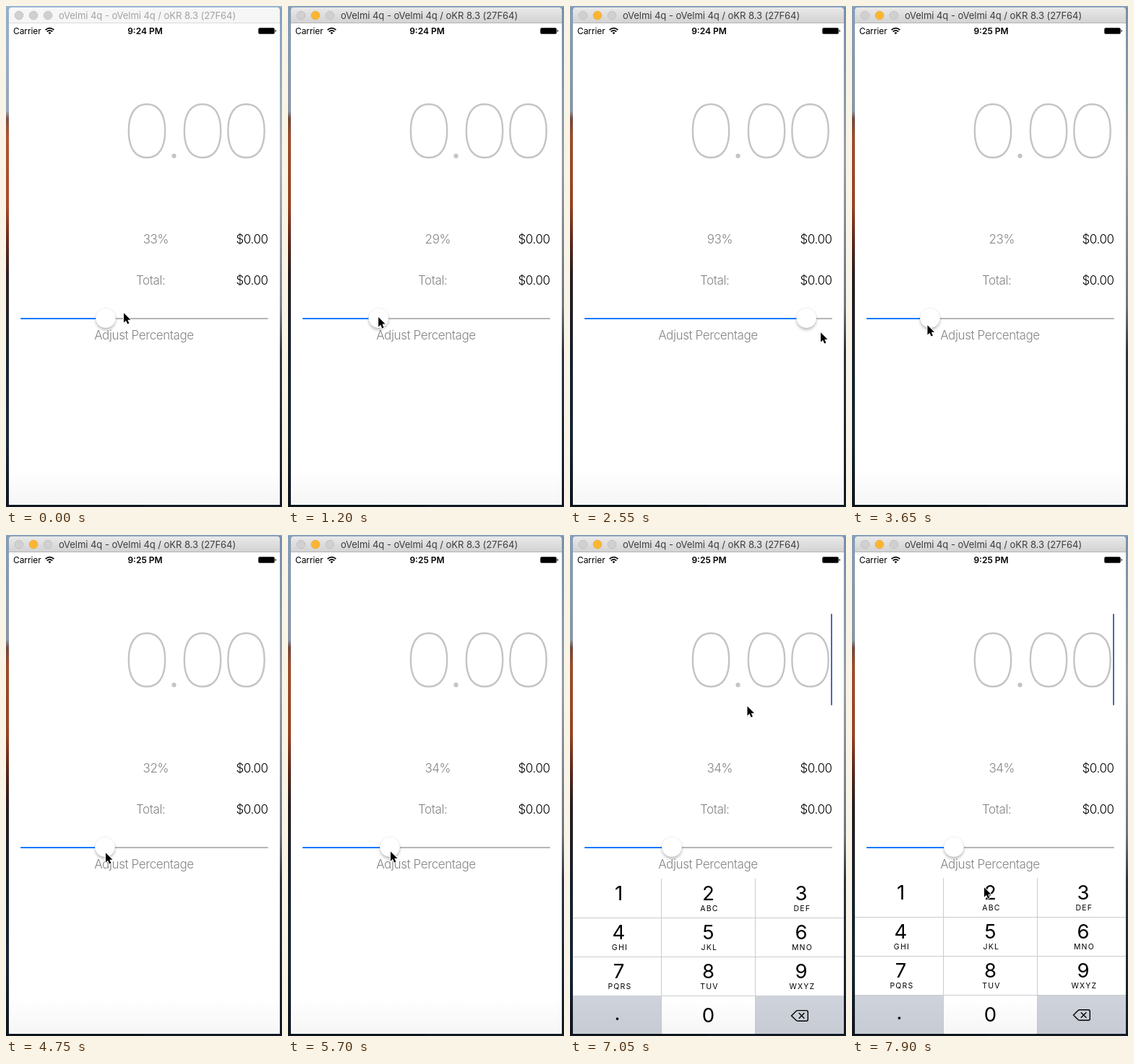
An HTML page that plays this animation: 382x694 px, repeating every 8000 ms.

```html
<!DOCTYPE html>
<html lang="en">
<head>
<meta charset="utf-8">
<title>Tip calculator</title>
<style>
  html, body { margin: 0; width: 100%; height: 100%; overflow: hidden; background: #fff; }
  svg { display: block; width: 100%; height: 100%; }
  text { font-family: Inter, Roboto, sans-serif; }
  .label { font-size: 17px; font-weight: 300; letter-spacing: -.4px; }
  .dim { fill: #858585; }
  .mid { text-anchor: middle; }
  .end { text-anchor: end; }
  .status { font-size: 12px; }
  .digit { font-size: 27.5px; text-anchor: middle; }
  .letters { font-size: 10.5px; letter-spacing: 1.2px; text-anchor: middle; }
</style>
</head>
<body>
<svg id="stage" viewBox="0 0 382 694">
  <defs>
    <linearGradient id="skyLeft" x2="0" y2="1">
      <stop offset="0" stop-color="#9dbbd8"/>
      <stop offset=".21" stop-color="#a3b2c4"/>
      <stop offset=".225" stop-color="#84584a"/>
      <stop offset=".26" stop-color="#b65c38"/>
      <stop offset=".4" stop-color="#b0502d"/>
      <stop offset=".47" stop-color="#6b3022"/>
      <stop offset=".54" stop-color="#2d2427"/>
      <stop offset=".7" stop-color="#1a2633"/>
      <stop offset=".86" stop-color="#1b2c3b"/>
      <stop offset="1" stop-color="#111923"/>
    </linearGradient>
    <linearGradient id="skyRight" x2="0" y2="1">
      <stop offset="0" stop-color="#8aaccd"/>
      <stop offset=".3" stop-color="#b4bdc8"/>
      <stop offset=".6" stop-color="#838b98"/>
      <stop offset=".69" stop-color="#343e4b"/>
      <stop offset="1" stop-color="#131e2b"/>
    </linearGradient>
    <linearGradient id="barOn" x2="0" y2="1">
      <stop offset="0" stop-color="#e9e9e9"/>
      <stop offset="1" stop-color="#d2d2d2"/>
    </linearGradient>
    <linearGradient id="foot" x2="0" y2="1">
      <stop offset="0" stop-opacity="0"/>
      <stop offset="1" stop-opacity=".035"/>
    </linearGradient>
    <filter id="soft" x="-50%" y="-50%" width="200%" height="200%">
      <feGaussianBlur stdDeviation="2.2"/>
    </filter>
    <clipPath id="screen"><rect x="4" y="24" width="375" height="667"/></clipPath>
    <path id="zero" d="M-25.2 0C-25.2-24-16-37-0-37S25.2-24 25.2 0S16 37 0 37S-25.2 24-25.2 0z"/>
  </defs>

  <rect width="191" height="694" fill="url(#skyLeft)"/>
  <rect x="191" width="191" height="694" fill="url(#skyRight)"/>
  <rect width="382" height="2" fill="#a0c0e0"/>
  <rect id="shade" width="382" height="694"/>

  <path id="bar" d="M4 24V6q0-4 4-4H375q4 0 4 4V24z"/>
  <path id="edge" d="M4 23.5H379"/>
  <g stroke-width=".8">
    <circle cx="18" cy="13" r="5.8" fill="#d0d0d0" stroke="#bdbdbd"/>
    <circle id="amber" cx="38" cy="13" r="5.8"/>
    <circle cx="58" cy="13" r="5.8" fill="#d0d0d0" stroke="#bdbdbd"/>
  </g>
  <text id="title" x="73" y="18" font-size="13" letter-spacing="-.05">oVelmi 4q - oVelmi 4q / oKR 8.3 (27F64)</text>

  <g clip-path="url(#screen)">
    <rect x="4" y="24" width="375" height="667" fill="#fff"/>
    <text class="status" x="10" y="38.5" letter-spacing="-.1">Carrier</text>
    <g fill="none" stroke="#000" stroke-width="1.7">
      <path d="M54.6 33.2q5.9-5.2 11.8 0M56.7 35.5q3.8-3.3 7.6 0"/>
      <path d="M60.5 39.2l-2-2.1q2-1.6 4 0z" fill="#000" stroke="none"/>
    </g>
    <text id="clock" class="status mid" x="192.5" y="38.5" font-weight="600"></text>
    <rect x="349.5" y="30.5" width="22" height="8" rx="1.6" stroke="#000" stroke-opacity=".45"/>
    <path d="M372.6 33q1.4.3 1.4 1.5t-1.4 1.5z"/>

    <g role="img" aria-label="0.00" fill="none" stroke="#c4c4c6" stroke-width="2.4">
      <use href="#zero" x="195" y="173"/>
      <use href="#zero" x="272" y="173"/>
      <use href="#zero" x="332.5" y="173"/>
      <circle cx="232.5" cy="207.7" r="3.1" fill="#c4c4c6" stroke="none"/>
    </g>
    <rect id="caret" x="361" y="109" width="2" height="127" rx="1" fill="#4a6bae"/>

    <text id="percent" class="label dim mid" x="207.3" y="328.5"></text>
    <text class="label end" x="362.6" y="328.5">$0.00</text>
    <text class="label dim" x="180" y="386">Total:</text>
    <text class="label end" x="362.6" y="386">$0.00</text>
    <text class="label dim mid" x="191" y="461.5">Adjust Percentage</text>

    <rect x="20" y="432" width="343" height="2" rx="1" fill="#b6b6b6"/>
    <rect id="fill" x="20" y="432" height="2" rx="1" fill="#0a7aff"/>
    <g id="thumb">
      <circle cy="3" r="13.5" opacity=".28" filter="url(#soft)"/>
      <circle r="14" fill="#fff" stroke="#000" stroke-opacity=".1" stroke-width=".6"/>
    </g>

    <g id="keys"></g>
    <rect x="4" y="640" width="375" height="51" fill="url(#foot)"/>
  </g>

  <path id="arrow" d="M0 .3V13.6L3 10.7L5.2 15.6L7.4 14.6L5.3 9.8H9.5z" stroke="#fff" stroke-width="1.8" paint-order="stroke"/>
</svg>
<script>
const LOOP = 8000, STEP = 50;
const WAKE = 1000, MINUTE = 3100, TAP = 6630;
const $ = id => document.getElementById(id);
const set = (id, attrs) => {
  for (const k in attrs) $(id).setAttribute(k, attrs[k]);
};

// [time, x, y] of the pointer tip
const pointer = [
  [0, 163, 425], [350, 163, 425], [850, 139, 431], [1000, 139, 431],
  [1750, 60, 430], [1850, 62, 430], [2550, 347, 452], [2750, 350, 452],
  [3550, 103, 442], [3700, 105, 442], [4750, 138, 440], [5100, 142, 440],
  [5800, 142, 438], [6450, 264, 161], [6800, 264, 161],
  [7600, 184, 488], [7900, 183, 488]
];
// [time, x] of the slider thumb
const slider = [
  [0, 138], [1000, 138], [1750, 66], [1850, 68.2],
  [2550, 327.2], [2780, 331], [3600, 107], [3700, 109],
  [4750, 137], [5100, 141]
];

const ease = u => u * u * (3 - 2 * u);

function along(keys, t) {
  const i = keys.findIndex(k => k[0] > t);
  if (i < 0) return keys[keys.length - 1].slice(1);
  const [a, b] = [keys[i - 1], keys[i]];
  const u = ease((t - a[0]) / (b[0] - a[0]));
  return a.slice(1).map((v, j) => v + (b[j + 1] - v) * u);
}

// Critically damped spring
function spring(ms) {
  const w = Math.max(0, ms) * .0182;
  return 1 - (1 + w) * Math.exp(-w);
}

function keypad() {
  const letters = ["", "ABC", "DEF", "GHI", "JKL", "MNO", "PQRS", "TUV", "WXYZ"];
  const cols = [67.5, 191.5, 320];
  let out = `<rect x="4" y="475" width="375" height="216" fill="#fff"/>
    <path d="M4 638H126V691H4zM257 638H379V691H257z" fill="#ced2da"/>
    <path d="M126.5 475V691M256.5 475V691M4 529.5H379M4 583.5H379M4 637.5H379" stroke="#c9cbcf" fill="none"/>`;
  letters.forEach((s, i) => {
    const x = cols[i % 3], y = 505 + 54 * Math.floor(i / 3);
    out += `<text class="digit" x="${x}" y="${y}">${i + 1}</text>
      <text class="letters" x="${x + 1.4}" y="${y + 15}">${s}</text>`;
  });
  return out + `<text class="digit" x="65.5" y="671">.</text>
    <text class="digit" x="191.5" y="674">0</text>
    <path d="M306.5 665L313 658.6Q314 657.7 315.4 657.7H327Q329.3 657.7 329.3 660V670Q329.3 672.3 327 672.3H315.4Q314 672.3 313 671.4zM316.8 661.2L324.4 668.8M324.4 661.2L316.8 668.8" fill="none" stroke="#000" stroke-width="1.4"/>`;
}

function draw(t) {
  const awake = t >= WAKE;
  set("bar", { fill: awake ? "url(#barOn)" : "#f6f6f6" });
  set("edge", { stroke: awake ? "#b4b4b4" : "#dadada" });
  set("amber", { fill: awake ? "#fdb532" : "#d0d0d0", stroke: awake ? "#eba92c" : "#bdbdbd" });
  set("title", { fill: awake ? "#3d3d3d" : "#a3a3a3" });
  set("shade", { opacity: awake ? .16 : .06 });
  $("clock").textContent = t < MINUTE ? "9:24 PM" : "9:25 PM";

  const [x] = along(slider, t);
  set("thumb", { transform: `translate(${x} 432)` });
  set("fill", { width: x - 20 });
  $("percent").textContent = Math.floor((x - 33.3) / 3.15) + "%";

  const since = t - TAP;
  set("keys", { transform: `translate(0 ${216 * (1 - spring(since))})` });
  set("caret", { opacity: since > 50 && (since - 70) % 1000 < 550 ? 1 : 0 });

  const [px, py] = along(pointer, t);
  set("arrow", { transform: `translate(${px} ${py})` });
}

$("keys").innerHTML = keypad();
const start = performance.now();
function tick() {
  const t = (performance.now() - start) % LOOP;
  draw(Math.floor(t / STEP) * STEP);
  requestAnimationFrame(tick);
}
tick();
</script>
</body>
</html>
```
